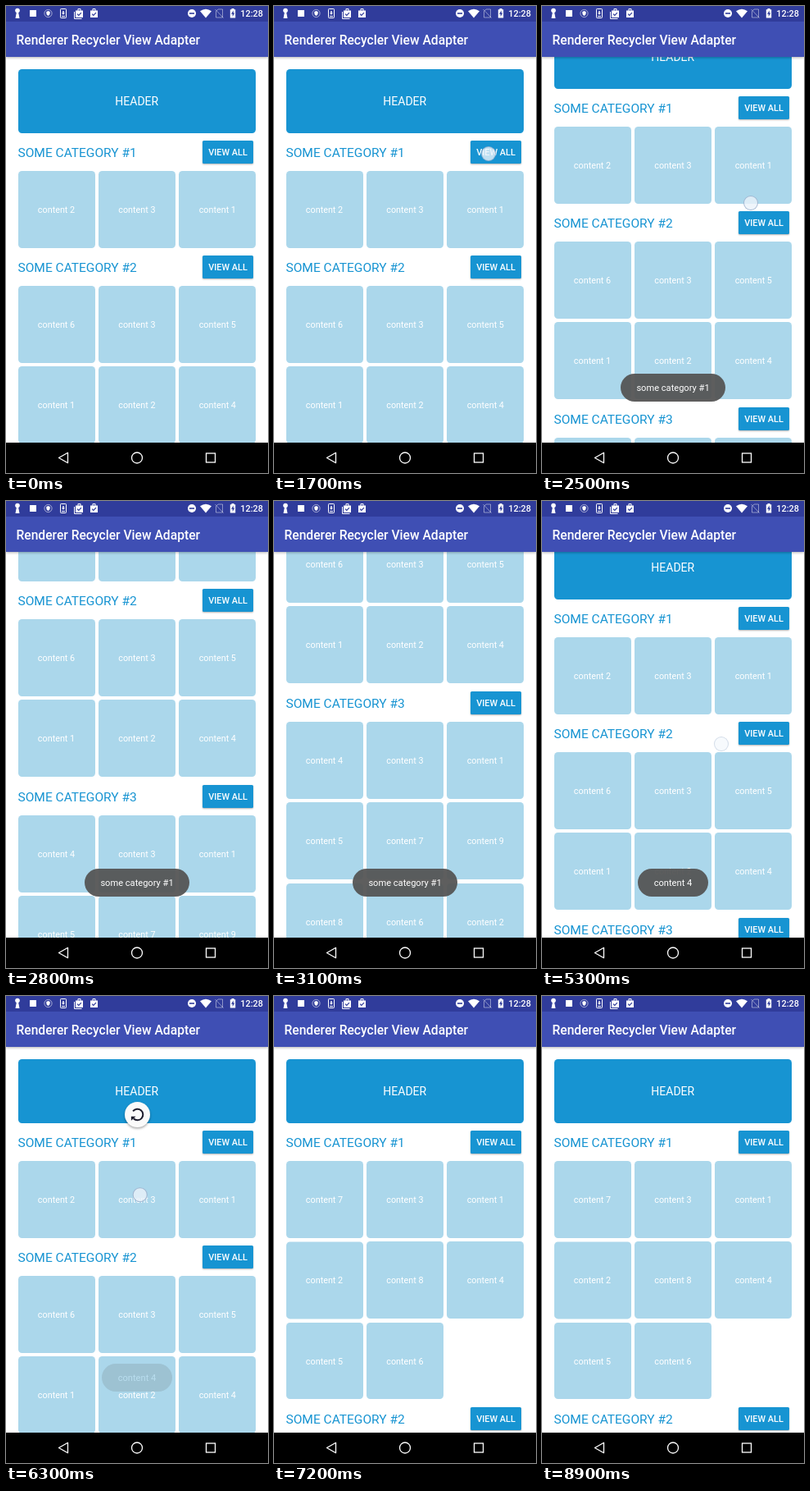
Write an HTML page that moves like this. It is 320x569 px and loops after 9000 ms.

```html
<!DOCTYPE html>
<html lang="en">
<head>
<meta charset="utf-8">
<title>Renderer Recycler View Adapter</title>
<style>
  html, body { margin: 0; width: 100%; height: 100%; overflow: hidden; background: #fff; }
  #stage { position: relative; width: 320px; height: 569px; overflow: hidden; background: #fff;
    font-family: Roboto, "Open Sans", sans-serif; color: #fff; }
  #stage div, #stage > svg { position: absolute; white-space: nowrap; }
  #list, .section { left: 0; top: 0; width: 320px; height: 0; }
  .header, .card, .button, .toast { display: flex; align-items: center; justify-content: center; }
  .header { left: 14.5px; top: 77px; width: 290.5px; height: 77.5px; border-radius: 4.5px;
    background: #1794d2; font-size: 14px; }
  .heading { left: 14.5px; top: .7px; line-height: 28px; font-size: 15.5px; color: #1794d2; }
  .button { left: 240px; top: 0; width: 62px; height: 28px; border-radius: 1.6px; background: #1794d2;
    font-size: 10.9px; font-weight: 500; box-shadow: 0 1px 2px rgba(0,0,0,.3); }
  .card { width: 94px; height: 93.7px; padding-top: 1px; box-sizing: border-box; border-radius: 4.5px;
    background: #abd7eb; font-size: 10.8px; }
  #spinner { left: 144.5px; top: -15.5px; width: 31px; height: 31px; border-radius: 50%;
    background: #fafafa; box-shadow: 0 1.5px 3px rgba(0,0,0,.35); }
  #bar { left: 0; top: 0; width: 320px; height: 62px; background: #3f4fb4; box-shadow: 0 1px 3px rgba(0,0,0,.3); }
  #status { left: 0; top: 0; width: 320px; height: 18.5px; background: #303c9b; }
  #clock { right: 6px; top: 0; line-height: 19px; font-size: 10.9px; font-weight: 500; }
  #title { left: 12.5px; top: 19px; line-height: 45px; font-size: 15.64px; font-weight: 500; }
  #nav { left: 0; top: 531.5px; width: 320px; height: 38px; background: #000; }
  .toast { top: 448px; height: 34px; padding-top: 1px; box-sizing: border-box; border-radius: 17px;
    background: rgba(84,84,84,.94); font-size: 11.1px; }
  #toastA { left: 96px; width: 128px; }
  #toastB { left: 117px; width: 86px; }
  #dot { left: -9px; top: -9px; width: 16px; height: 16px; border-radius: 50%;
    border: 1px solid rgba(130,155,190,.65); background: rgba(236,243,250,.8); }
  #icons, #keys { left: 0; top: 0; }
</style>
</head>
<body>
<div id="stage">
  <div id="list"><div class="header">HEADER</div></div>

  <div id="spinner">
    <svg id="arrow" width="31" height="31" viewBox="-15.5 -15.5 31 31">
      <path d="M-5.4 -4.1A6.8 6.8 0 1 1 -4.8 4.8" fill="none" stroke="#1b1b2c" stroke-width="2"/>
      <path d="M-7.6 7.2L-2 2.2H-7.6z" fill="#1b1b2c"/>
    </svg>
  </div>

  <div id="bar">
    <div id="status"></div>
    <div id="title">Renderer Recycler View Adapter</div>
    <div id="clock">12:28</div>
  </div>
  <svg id="icons" width="320" height="19" fill="#fff">
    <circle cx="14" cy="5.5" r="2.8"/><path d="M13 7h2l1.5 8h-5z"/>
    <rect x="29" y="5" width="8" height="8"/>
    <circle cx="51.5" cy="9" r="4.6" fill="none" stroke="#fff" stroke-opacity=".55"/>
    <path d="M49.3 7l2.2-1 2.2 1v2q0 2-2.2 3-2.2-1-2.2-3z"/>
    <rect x="66.5" y="3.5" width="7" height="11" rx=".8" fill="none" stroke="#fff"/>
    <path d="M69.3 6h1.4v2.5h1.3l-2 2.3-2-2.3h1.3zM68 12h4v1h-4z"/>
    <g id="bag">
      <path d="M85 5.5h2.5v-1.5q0-1 1-1h2q1 0 1 1v1.5h2.5v8.5h-9zM88.5 4v1.5h2v-1.5z" fill-rule="evenodd"/>
      <path d="M87 9.7l1.8 1.8 3.2-3.3" fill="none" stroke="#303c9b" stroke-width="1.2"/>
    </g>
    <use href="#bag" x="18"/>
    <path d="M83.5 7v8.5h9" fill="none" stroke="#fff"/>
    <circle cx="227" cy="9" r="5"/><path d="M224 8.2h6v1.6h-6z" fill="#303c9b"/>
    <path d="M237 6.2Q244 1.2 251 6.2L244 14.5z"/>
    <path d="M259 4h5.5v10h-8V6.5zM255.5 4l10 10.5" fill="none" stroke="#fff" opacity=".45"/>
    <path d="M275.5 3h3v1.2h1.7v10.3h-6.4V4.2h1.7z"/>
    <path d="M277.7 5.5L275 9.8h1.7V13l2.6-4.4h-1.6z" fill="#303c9b"/>
  </svg>

  <div class="toast" id="toastA">some category #1</div>
  <div class="toast" id="toastB">content 4</div>

  <div id="nav"></div>
  <svg id="keys" width="320" height="569" fill="none" stroke="#fff" stroke-width="1.3">
    <path d="M64.5 550.5L75.5 544.3V556.7z" stroke-linejoin="round"/>
    <circle cx="160" cy="550.5" r="6.5"/>
    <rect x="244.5" y="545" width="11" height="11"/>
  </svg>
  <div id="dot"></div>
</div>

<script>
const LOOP = 9000, TICK = 100, PITCH = 98.4, FAR = 322;
const $ = id => document.getElementById(id);

function add(parent, cls, text = '') {
  const el = document.createElement('div');
  el.className = cls;
  el.textContent = text;
  parent.append(el);
  return el;
}

function addCard(section, n, slot) {
  const card = add(section, 'card', 'content ' + n);
  card.style.left = 14.5 + slot % 3 * PITCH + 'px';
  card.style.top = 37 + Math.floor(slot / 3) * PITCH + 'px';
  return card;
}

let nextTop = 164;
function addSection(n, items) {
  const section = add($('list'), 'section');
  section.style.top = Math.round(nextTop) + 'px';
  nextTop += 42 + PITCH * Math.ceil(items.length / 3);
  add(section, 'heading', 'SOME CATEGORY #' + n);
  add(section, 'button', 'VIEW ALL');
  section.cards = items.map((item, slot) => addCard(section, item, slot));
  return section;
}

const first = addSection(1, [2, 3, 1]);
const lower = [
  addSection(2, [6, 3, 5, 1, 2, 4]),
  addSection(3, [4, 3, 1, 5, 7, 9, 8, 6, 2])
];
// After the refresh card 2 moves down a row and these join it.
const added = Object.entries({ 7: 0, 8: 4, 4: 5, 5: 6, 6: 7 })
  .map(([n, slot]) => addCard(first, n, slot));

// Touches: press and release times, with the path between them.
const touches = [
  { from: 1600, to: 1700, a: [262, 180], b: [262, 180] },
  { from: 2200, to: 2600, a: [252, 300], b: [256, 220] },
  { from: 3700, to: 3800, a: [258, 161], b: [258, 161] },
  { from: 5100, to: 5200, a: [215, 130], b: [219, 296] },
  { from: 5700, to: 6400, a: [168, 111], b: [163, 264] }
];

const ramp = (t, a, b) => Math.min(1, Math.max(0, (t - a) / (b - a)));
const smooth = p => p * p * (3 - 2 * p);
const easeOut = p => 1 - (1 - p) ** 2;
const fade = (t, show, hide) => ramp(t, show, show + 300) - ramp(t, hide, hide + 300);
const shift = (el, y) => el.style.transform = `translateY(${y}px)`;

function drawTouch(t) {
  const touch = touches.findLast(g => t >= g.from) || touches[0];
  const { from, to, a, b } = touch;
  const p = ramp(t, from, to);
  const [x, y] = a.map((v, i) => v + (b[i] - v) * p);
  $('dot').style.transform = `translate(${x}px, ${y}px)`;
  $('dot').style.opacity = t < from ? 0 : 1 - ramp(t, to, to + 200);
}

function draw(t) {
  const scroll = FAR * (smooth(ramp(t, 2250, 3208)) - easeOut(ramp(t, 5050, 5422)));
  shift($('list'), -Math.round(scroll));

  const grow = smooth(ramp(t, 6800, 7100));
  shift(first.cards[0], grow * PITCH);
  lower.forEach(section => shift(section, Math.round(grow * 2 * PITCH)));
  added.forEach(card => card.style.opacity = ramp(t, 7000, 7200));

  const pull = 144 * ramp(t, 5650, 6300) - 16.5 * ramp(t, 6400, 6600);
  $('spinner').style.transform = `translateY(${pull}px) scale(${1 - ramp(t, 6800, 7000)})`;
  $('arrow').style.transform = `rotate(${(t - 6300) / 5}deg)`;
  $('arrow').style.opacity = .3 + .7 * ramp(t, 5700, 6200);

  $('toastA').style.opacity = fade(t, 1800, 3900);
  $('toastB').style.opacity = fade(t, 4200, 6050);
  drawTouch(t);
}

function frame() {
  // The small lead keeps each tick clear of rounding.
  const t = (performance.now() + 3) % LOOP;
  draw(Math.floor(t / TICK) * TICK);
  requestAnimationFrame(frame);
}
frame();
</script>
</body>
</html>
```
